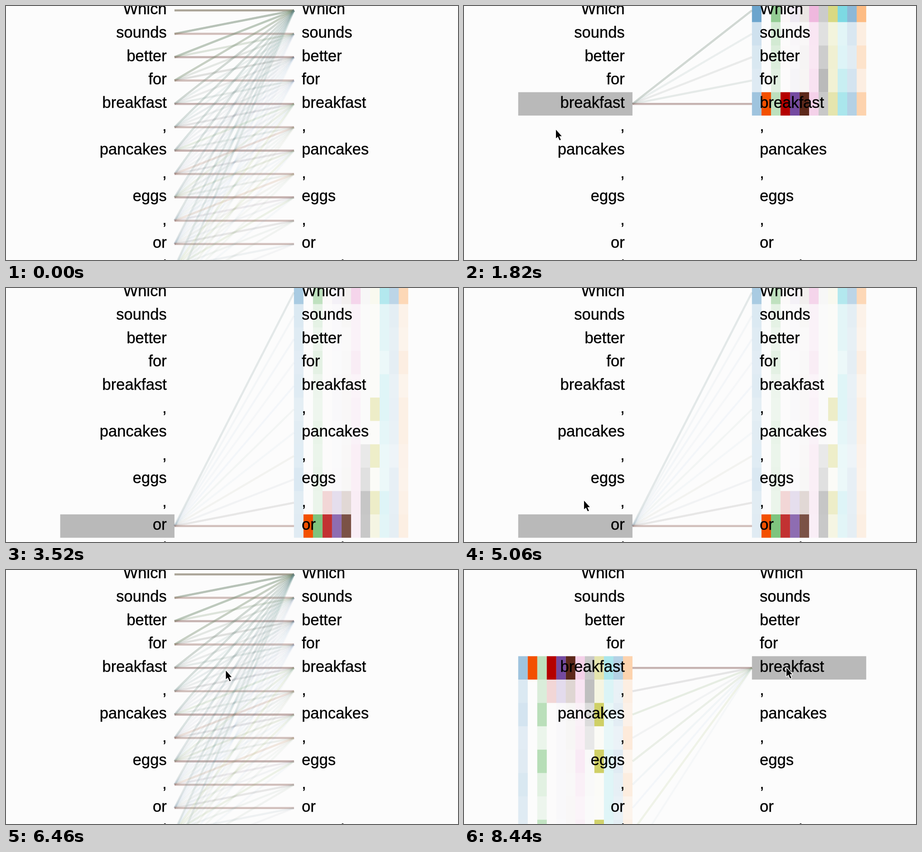
An HTML page for the animation above (8460 ms loop, 998x561 px).

```html
<!DOCTYPE html>
<html lang="en">
<head>
<meta charset="utf-8">
<title>Attention heads</title>
<style>
  html, body { margin: 0; width: 100%; height: 100%; overflow: hidden; background: #fcfcfc; }
  svg { display: block; width: 100vw; height: 100vh; }
  text { font: 34.6px "Liberation Sans", Arial, sans-serif; stroke: #000; stroke-width: .4; }
  #lines { stroke-width: 4.6; }
</style>
</head>
<body>
<svg viewBox="0 0 998 561">
  <g id="boxes"></g>
  <g id="lines"></g>
  <g id="words"></g>
  <path id="cursor" d="M1 2V21L5.2 17.2L9 25.4L11.8 24.2L8.2 16.2H13.8Z"
        fill="#000" stroke="#fff" stroke-width="3" stroke-linejoin="round" paint-order="stroke"/>
</svg>
<script>
const LOOP = 8460, HOVER_LAG = 130;
const ROW = 51.6, TOP = -16, BOX = 252.3, PAD = 17.2;
const LEFT = 119.7, LEFT_EDGE = LEFT + BOX, RIGHT = 635.8;
const WORDS = ['Which', 'sounds', 'better', 'for', 'breakfast', ',', 'pancakes', ',', 'eggs', ',', 'or', 'cereal', '?'];
const NOUNS = ['breakfast', 'pancakes', 'eggs', 'cereal'];
const LIGHT_WORDS = ['sounds', 'for', ',', 'or', '?'];

// Reach is how strongly a head looks back at the first word.
const HEADS = [
  { color: '#1f77b4', reach: .65, role: 'broad' },
  { color: '#f35000', reach: 0, role: 'comma' },
  { color: '#2ca02c', reach: .5, role: 'noun' },
  { color: '#b50000', reach: .02, role: 'self' },
  { color: '#744aa0', reach: .1, role: 'self' },
  { color: '#5c281a', reach: .1, role: 'self' },
  { color: '#e377c2', reach: .5, role: 'broad' },
  { color: '#7f7f7f', reach: .4, role: 'recent' },
  { color: '#bcbd22', reach: .55, role: 'list' },
  { color: '#17becf', reach: .55, role: 'broad' },
  { color: '#1f77b4', reach: .5, role: 'broad' },
  { color: '#ff7f0e', reach: .5, role: 'broad' }
];
const CELL = BOX / HEADS.length;

// Pointer path: time, x, y.
const PATH = [
  [880, 214, -30], [1820, 202, 271], [3520, 236, 568], [4800, 250, 575], [5060, 264, 468],
  [5780, 310, 286], [6150, 340, 226], [6800, 642, 214], [7280, 696, 215], [8440, 711, 214]
];

const byId = id => document.getElementById(id);
const rowTop = i => TOP + i * ROW;
const rowMiddle = i => rowTop(i) + ROW / 2;

function noise(...seeds) {
  const n = Math.sin(seeds.reduce((sum, s) => sum * 7.3 + s + 1, 0)) * 43758.5;
  return n - Math.floor(n);
}

// Extra attention that a head's role gives to an earlier word.
function preference(role, from, to) {
  const distance = from - to;
  const isNoun = NOUNS.includes(WORDS[to]);
  const bothNouns = isNoun && NOUNS.includes(WORDS[from]);
  const toComma = WORDS[to] === ',';
  switch (role) {
    case 'comma': return toComma && WORDS[from] === ',' && distance === 2 ? .9 : 0;
    case 'noun': return bothNouns ? .2 : 0;
    case 'recent': return distance < 4 ? .42 / distance : 0;
    case 'list': return bothNouns ? .65 : toComma ? .22 : 0;
    case 'self': return distance === 1 && LIGHT_WORDS.includes(WORDS[from]) ? .15 : 0;
    default: return 0;
  }
}

function weight(from, to, index) {
  const { reach, role } = HEADS[index];
  const light = LIGHT_WORDS.includes(WORDS[from]);
  if (from === 0) return 1;
  if (from === to) {
    if (role === 'comma') return 1;
    if (role === 'self') return light ? .8 : 1;
    if (role === 'recent') return .42;
    if (role === 'noun') return light ? .6 : .3;
    return reach * (light ? .2 : .65);
  }
  const local = role === 'recent' || role === 'list';
  const fade = (4 / from) ** (local ? 2.5 : .6);
  if (to === 0) return Math.min(1, reach * fade);
  const background = reach * fade * .3 * (.6 + .8 * noise(from, to, index));
  return Math.min(1, background + preference(role, from, to));
}

function lines(from, to) {
  const y1 = rowMiddle(from), y2 = rowMiddle(to);
  return HEADS.map(({ color }, head) => {
    const opacity = weight(from, to, head) / HEADS.length;
    return `<path d="M${LEFT_EDGE} ${y1}L${RIGHT} ${y2}" stroke="${color}" stroke-opacity="${opacity.toFixed(4)}"/>`;
  }).join('');
}

const box = (x, row, width, color, opacity = 1) =>
  `<rect x="${x}" y="${rowTop(row)}" width="${width}" height="${ROW}" fill="${color}" fill-opacity="${opacity}"/>`;

const cells = (x, row, from, to) =>
  HEADS.map(({ color }, head) => box(x + head * CELL, row, CELL, color, weight(from, to, head))).join('');

function pointerAt(t) {
  const next = PATH.findIndex(key => key[0] >= t);
  if (next === 0) return PATH[0].slice(1);
  if (next < 0) return PATH[PATH.length - 1].slice(1);
  const [t0, x0, y0] = PATH[next - 1], [t1, x1, y1] = PATH[next];
  const p = (t - t0) / (t1 - t0);
  return [x0 + (x1 - x0) * p, y0 + (y1 - y0) * p];
}

function hoverAt(t) {
  const [x, y] = pointerAt(t - HOVER_LAG);
  const row = Math.floor((y - TOP) / ROW);
  const onLeft = x >= LEFT && x < LEFT_EDGE, onRight = x >= RIGHT && x < RIGHT + BOX;
  return row >= 0 && (onLeft || onRight) ? { row, onLeft } : null;
}

function showHover(hover) {
  let boxes = hover ? box(hover.onLeft ? LEFT : RIGHT, hover.row, BOX, '#b9b9b9') : '';
  let strokes = '';
  WORDS.forEach((_, from) => {
    for (let to = 0; to <= from; to++) {
      if (hover && hover.row !== (hover.onLeft ? from : to)) continue;
      strokes += lines(from, to);
      if (hover) boxes += hover.onLeft ? cells(RIGHT, to, from, to) : cells(LEFT, from, from, to);
    }
  });
  byId('boxes').innerHTML = boxes;
  byId('lines').innerHTML = strokes;
}

byId('words').innerHTML = WORDS.map((word, i) => {
  const y = rowTop(i) + 34.4;
  return `<text x="${LEFT_EDGE - PAD}" y="${y}" text-anchor="end">${word}</text>` +
         `<text x="${RIGHT + PAD}" y="${y}">${word}</text>`;
}).join('');

let shown;
function render(t) {
  const hover = hoverAt(t);
  const key = JSON.stringify(hover);
  if (key !== shown) {
    showHover(hover);
    shown = key;
  }
  const [x, y] = pointerAt(t);
  byId('cursor').setAttribute('transform', `translate(${x.toFixed(1)} ${y.toFixed(1)})`);
}

const start = performance.now();
function tick() {
  render((performance.now() - start) % LOOP);
  requestAnimationFrame(tick);
}
tick();
</script>
</body>
</html>
```
